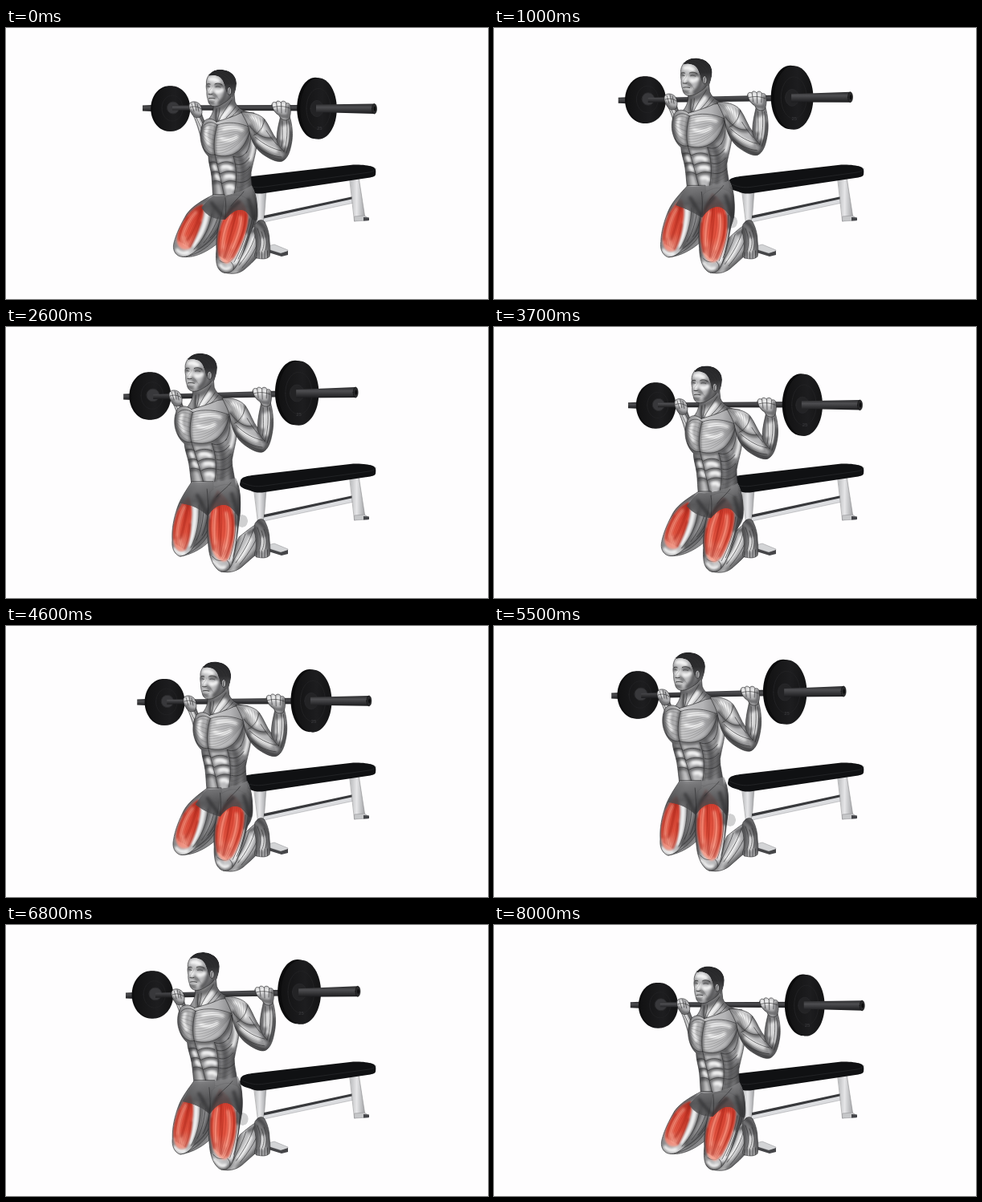
Animation of 600 by 338 pixels, one loop 8.1 s. Source, as an HTML page:

```html
<!DOCTYPE html>
<html lang="en">
<head>
<meta charset="utf-8">
<title>Kneeling barbell squat</title>
<style>
html, body { margin: 0; width: 100%; height: 100%; overflow: hidden; background: #fefdfe; }
svg { display: block; width: 100vw; height: 100vh; }
path { stroke-linecap: round; stroke-linejoin: round; }
.edge { fill: none; stroke: #2c2c2e; stroke-width: .9; opacity: .75; }
.line { fill: none; stroke: #2b2b2d; stroke-width: .85; opacity: .75; }
.hair { fill: none; stroke: #3f3f41; stroke-width: .45; opacity: .5; }
.dark { fill: none; stroke: #2a2a2c; stroke-width: 4.500; opacity: .55; filter: blur(1.7px); }
.deep { fill: none; stroke: #29292b; stroke-width: 9; opacity: .6; filter: blur(2.800px); }
.lite { fill: none; stroke: #fff; stroke-width: 4.500; opacity: .85; filter: blur(1.4px); }
.glow { fill: none; stroke: #ffb09c; stroke-width: 4; opacity: .65; filter: blur(1.5px); }
.red { fill: url(#red); filter: blur(.8px); }
.fibre { fill: none; stroke: #8f1c12; stroke-width: .5; opacity: .5; }
.burn { fill: none; stroke: #9b170d; stroke-width: 2.5; opacity: .5; filter: blur(1.2px); }
.ink { fill: none; stroke: #222; stroke-width: .95; opacity: .85; }
text { font: 700 6px "Liberation Sans", Arial, sans-serif; fill: #343437; }
</style>
</head>
<body>
<svg id="stage" viewBox="0 0 600 338" preserveAspectRatio="none">
  <defs id="defs">
    <linearGradient id="skin"><stop offset="0" stop-color="#818183"/><stop offset=".3" stop-color="#c9c9ca"/><stop offset=".65" stop-color="#b4b4b6"/><stop offset="1" stop-color="#6f6f71"/></linearGradient>
    <linearGradient id="face"><stop offset="0" stop-color="#a9a9ab"/><stop offset=".3" stop-color="#d2d2d3"/><stop offset=".6" stop-color="#a5a5a7"/><stop offset="1" stop-color="#707072"/></linearGradient>
    <linearGradient id="sole" x2="0" y2="1"><stop offset="0" stop-color="#69696b"/><stop offset="1" stop-color="#a4a4a6"/></linearGradient>
    <linearGradient id="crop" x2="0" y2="1"><stop offset="0" stop-color="#262628"/><stop offset=".5" stop-color="#2c2c2e"/><stop offset="1" stop-color="#626264"/></linearGradient>
    <linearGradient id="red" x2="0" y2="1"><stop offset="0" stop-color="#a83a2f"/><stop offset=".25" stop-color="#da4434"/><stop offset=".65" stop-color="#e65743"/><stop offset="1" stop-color="#efa091"/></linearGradient>
    <linearGradient id="shorts" x2="0" y2="1"><stop offset="0" stop-color="#8b8b8d" stop-opacity=".6"/><stop offset=".2" stop-color="#737375" stop-opacity=".9"/><stop offset=".6" stop-color="#4e4e50" stop-opacity=".9"/><stop offset="1" stop-color="#434345" stop-opacity=".65"/></linearGradient>
    <linearGradient id="steel" x2="0" y2="1"><stop offset="0" stop-color="#2b2b2d"/><stop offset=".35" stop-color="#4e4e51"/><stop offset="1" stop-color="#1b1b1d"/></linearGradient>
    <linearGradient id="disc"><stop offset="0" stop-color="#121213"/><stop offset=".6" stop-color="#1d1d1f"/><stop offset="1" stop-color="#131314"/></linearGradient>
    <linearGradient id="leg"><stop offset="0" stop-color="#b9babc"/><stop offset=".45" stop-color="#e6e6e8"/><stop offset="1" stop-color="#9fa0a3"/></linearGradient>
  </defs>
  <g id="bench">
    <path d="M309 204L324 202L321 242L314 244Z" fill="url(#leg)" stroke="#8b8b8e" stroke-width=".6"/>
    <path d="M326 272L334 270L351 277L350 280L342 281L326 276Z" fill="#d3d4d6" stroke="#8f8f92" stroke-width=".5"/>
    <path d="M326 276L342 281L351 278L351 283L343 285L327 280Z" fill="#454548"/>
    <path d="M321 236L437 211L438 217L321 242Z" fill="#dcdde0" stroke="#98999c" stroke-width=".5"/>
    <path d="M321 234L437 209L437 212L321 237.500Z" fill="#38393c"/>
    <path d="M428 188L439 186L447 237L434 241Z" fill="url(#leg)" stroke="#8b8b8e" stroke-width=".6"/>
    <path d="M434 235L446 234L451 237L451 240L434 241Z" fill="#c6c7c9" stroke="#88898c" stroke-width=".5"/>
    <path d="M445 236L452 236.500L452 240L445 240.500Z" fill="#444549"/>
    <path d="M292 191C294 187 300 186 306 185L428 171C438 170 450 171 456 173C460 174 461 177 460 183C459 186 455 186 450 187L322 206C316 207 310 207 304 204C297 202 291 200 291 196Z" fill="#101113"/>
    <path d="M294 194C302 198 312 200 322 198L452 180C457 179 459 178 460 176" fill="none" stroke="#26282a" stroke-width=".8"/>
  </g>
</svg>
<script>
const NS = 'http://www.w3.org/2000/svg', NUM = /-?\d+\.?\d*/g;
const stage = document.getElementById('stage'), defs = document.getElementById('defs');
const moving = [];

function el(tag, parent, attrs = {}) {
  const node = parent.appendChild(document.createElementNS(NS, tag));
  for (const k in attrs) node.setAttribute(k, attrs[k]);
  return node;
}
// Blend two paths of equal structure, with separate amounts for x and y.
function mix(a, b, kx, ky = kx) {
  const n = b.match(NUM);
  let i = 0;
  return a.replace(NUM, v => {
    const k = i % 2 ? ky : kx;
    return (+v + (n[i++] - v) * k).toFixed(2);
  });
}
function warp(d, f) {
  const n = d.match(NUM).map(Number);
  let i = 0;
  return d.replace(NUM, () => {
    const j = i++, e = j & ~1;
    return f(n[e], n[e + 1])[j & 1].toFixed(2);
  });
}
function oval(x, y, rx, ry) {
  const a = rx * .552, b = ry * .552;
  return `M${x - rx} ${y}C${x - rx} ${y - b} ${x - a} ${y - ry} ${x} ${y - ry}` +
    `C${x + a} ${y - ry} ${x + rx} ${y - b} ${x + rx} ${y}C${x + rx} ${y + b} ${x + a} ${y + ry} ${x} ${y + ry}` +
    `C${x - a} ${y + ry} ${x - rx} ${y + b} ${x - rx} ${y}Z`;
}
const strands = (a, b, n) => Array.from({ length: n }, (_, i) => mix(a, b, i / (n - 1))).join('');

function morph(parent, low, to, attrs) {
  const high = typeof to === 'function' ? warp(low, to) : to || low;
  moving.push({ node: el('path', parent, attrs), low, high });
}
function part(low, to, fill, layers = [], edge = true) {
  const id = 'clip' + moving.length;
  morph(el('clipPath', defs, { id }), low, to);
  const g = el('g', stage, { 'clip-path': `url(#${id})` });
  morph(g, low, to, { fill });
  for (const [cls, d, dTo] of layers) morph(g, d, dTo || to, { class: cls });
  if (edge) morph(stage, low, to, { class: 'edge' });
}
const shift = (dx, dy) => (x, y) => [x + dx, y + dy];

const headTo = (x, y) => [222.5 + (x - 249) * 1.06, 33 + (y - 52) * 1.03];
const neckTo = (x, y) => [x - 26, y - 17 + (y - 90) * .1];
const trunkTo = (x, y) => [211 + (x - 243) * 1.1 + .05 * (y - 140), y - 14.5];
const armTo = (x, y) => [x - 24, 1.1 * y - 27];
const rightHandTo = shift(-24, -16), leftHandTo = shift(-25, -13);
const leftDiscTo = (x, y) => [179 + (x - 204.5) * 1.06, 86 + (y - 100.5) * 1.05];
const rightDiscTo = (x, y) => [362 + (x - 387) * 1.1, 82.5 + (y - 100.5) * 1.05];

// Far heel, shin and glute
part(oval(300, 241, 7, 8), oval(294, 242, 7, 8), '#d0d0d1', [], false);
part('M219 285C232 288 250 280 264 268L264 246L240 258Z', 'M217 286C232 284 248 274 256 264L254 238L236 254Z', '#8c8c8e', [
  ['deep', 'M240 272C250 266 258 258 264 248', 'M236 270C242 264 250 256 254 242'],
  ['line', 'M228 284C242 280 254 272 262 260', 'M226 283C238 276 248 268 253 256']
]);
part('M294 199C306 198 314 215 313 235C312 246 304 254 297 258L288 220Z',
  'M274 193C288 194 293 210 291 232C290 240 289 248 286 252L270 220Z', '#555557');

// Near calf and foot
part('M272 305C282 308 292 306 298 300C308 292 318 280 326 270L322 242C314 240 304 252 299 258C292 274 284 290 272 305Z',
  'M268 305C280 308 290 303 296 297C306 288 316 280 326 270L320 241C312 245 302 252 290 262C284 276 278 290 268 305Z', 'url(#skin)', [
  ['deep', 'M298 258C296 272 290 286 280 298M324 272C314 284 304 296 292 304', 'M287 262C284 276 280 288 274 300M324 272C314 282 302 294 290 302'],
  ['dark', 'M304 254C312 252 318 250 322 254', 'M302 257C310 252 316 249 322 252'],
  ['lite', 'M308 262C304 274 300 282 293 290', 'M304 265C300 274 296 282 289 290'],
  ['line', 'M318 250C316 266 308 284 294 299M312 252C308 270 300 284 290 296M304 256C300 270 294 284 286 296', 'M316 250C314 264 304 280 291 296M308 252C304 266 296 280 286 294M298 258C294 270 288 282 282 294']
]);
part('M310 245C314 238 321 238 323 244C326 250 328 258 328 266C329 274 329 281 328 285C324 289 318 288 312 287C309 286 309 282 311 278C312 270 311 262 309 254Z', '', 'url(#sole)', [
  ['dark', 'M310 250C314 262 313 272 311 284M328 260C326 270 327 276 328 284M314 242C320 246 324 252 326 260'],
  ['lite', 'M320 264C321 270 320 274 319 278'],
  ['line', 'M312 280L312 288M315 279L315 288M318.500 279L318.500 289M322 278L322 289M325.500 278L325.500 288M313 250C317 260 318 268 315 278M318 254C322 264 322 270 319 278M321 252C325 262 325 270 323 277']
]);

// Left disc, bar, left forearm
morph(stage, 'M170 96.500L182 96L182 104L170 103.500Z', 'M146 83.500L158 83L158 91L146 90.500Z', { fill: 'url(#steel)' });
morph(stage, oval(203, 100.5, 22.8, 28.3), leftDiscTo, { fill: '#0d0d0e' });
morph(stage, oval(206, 100.5, 23.3, 28.3), leftDiscTo, { fill: 'url(#disc)' });
morph(stage, oval(207, 100, 13, 16), leftDiscTo, { fill: 'none', stroke: '#212123', 'stroke-width': 1 });
morph(stage, oval(208, 99.5, 7.5, 7.5), leftDiscTo, { fill: '#38383b', stroke: '#29292b' });
morph(stage, 'M207 96.500L386 96L386 103.500L207 102.500Z', 'M183 84L360 79L360 87L183 90Z', { fill: 'url(#steel)' });
part('M232 107C236 114 239 124 243 138L254 132C250 122 246 115 243 106Z', leftHandTo, '#8f8f91', [
  ['dark', 'M244 110C248 118 251 126 253 134'], ['lite', 'M237 110C240 116 242 122 244 128'], ['line', 'M236 110C240 118 244 126 246 134M240 109C244 116 247 122 250 130']
]);
part('M228 95C230 91 236 91 240 94C244 97 245 104 243 110C239 113 234 112 232 108C229 104 227 100 228 95Z', leftHandTo, '#b0b0b2', [
  ['dark', 'M230 104C234 110 238 112 243 110'],
  ['lite', 'M231 95L234 99'],
  ['line', 'M231 94L234 104M235 93L237 103M238 95L240 104M229 99C234 97 239 98 243 101']
]);

// Neck and trunk
part('M258 94C259 103 257 109 250 116L262 120L306 112C307 110 308 108 309 106C298 106 288 100 285 92L284 82Z', neckTo, 'url(#skin)', [
  ['deep', 'M258 98C266 102 276 97 283 88M285 92C286 100 294 106 306 108'], ['lite', 'M279 99C275 105 271 109 268 113'],
  ['dark', 'M262 104C260 110 261 114 262 118'],
  ['line', 'M281 90C275 99 268 108 264 117M262 101C261 108 261 112 262 117M286 98C282 104 278 108 274 112M266 100C266 106 264 110 263 116M290 101C286 106 282 110 278 112']
]);
part('M262 117C256 112 250 112 246 117C242 124 241 135 243 143C245 152 249 157 252 160C252 168 255 176 256 185C257 195 257 203 258 214L307 214C308 202 304 190 305 180C308 165 313 150 312 140L312 112C305 104 298 105 292 106C282 111 272 114 262 117Z', trunkTo, 'url(#skin)', [
  ['deep', 'M306 176C303 190 306 202 307 212M290 160C296 170 296 186 292 204M253 164C256 180 257 196 258 212'],
  ['dark', 'M246 152C252 160 258 161 262 160C274 163 288 160 296 148M284 162C288 176 288 194 285 208M262 122C259 136 258 148 260 158M253 169C258 168 262 168 264 171C270 168 278 168 284 170M256 182C260 179 264 180 267 183C273 179 281 179 286 181M258 193C262 191 266 192 269 195C275 191 282 191 287 193M260 160C264 176 268 192 272 210M304 125C304 134 300 144 294 151M244 122C242 130 242 140 245 148'],
  ['lite', 'M271 126C278 123 288 124 294 127M268 138C276 141 282 140 287 136M251 124C248 130 249 138 252 144M259 172L261 176M270 173C274 172 278 173 280 175M262 184L265 188M274 185C278 184 281 184 283 186M276 198C279 197 282 198 283 200M307 136C309 144 308 154 304 164'],
  ['hair', strands('M263 124C275 120 290 120 303 124', 'M261 156C272 158 288 150 303 127', 11) + strands('M261 124C256 120 250 121 247 124', 'M258 156C253 156 248 150 244 140', 7)],
  ['hair', strands('M285 164C292 168 298 164 302 158', 'M287 204C292 204 298 200 304 196', 9)],
  ['line', 'M263 121C259 134 258 147 260 158M263 121C275 116 292 118 304 124M260 158C270 162 285 160 293 150C298 144 302 136 304 126M263 121C257 116 250 117 247 121M260 158C254 159 248 156 245 148'],
  ['line', 'M260 158C264 175 268 190 272 212M253 168C258 166 262 167 264 170C270 166 278 166 283 169M256 180C260 178 264 179 267 182C273 178 281 178 285 180M258 191C262 190 266 191 269 194C275 190 282 190 287 192M283 160C287 172 288 190 284 208'],
  ['line', 'M283 160C290 163 296 160 300 154M286 170C293 172 299 168 303 162M288 180C294 182 300 178 304 173M288 192C296 194 302 190 305 186M304 126C306 136 304 148 299 156']
]);

// Far thigh
const fade = (a, b) => strands(a, b, 9);
part('M258 208C246 214 232 222 225 232C218 244 212 256 209 268C207 276 210 283 217 285C226 287 232 281 238 277C248 271 258 262 266 250C272 242 274 232 274 222L272 208Z',
  'M231 193C224 204 217 214 213 226C209 238 206 252 207 266C206 275 209 283 216 286C222 286 228 282 233 275C240 268 248 262 252 250C256 242 258 230 258 218L258 193Z', 'url(#skin)', [
  ['deep', 'M272 234C268 250 256 264 240 276M250 214C240 218 230 226 224 236', 'M255 228C252 246 246 262 234 274M232 196C224 206 218 216 215 226'],
  ['dark', 'M258 226C256 244 248 260 238 272', 'M242 220C243 240 240 258 232 272'],
  ['lite', 'M250 232C248 246 242 260 234 271M213 277C216 281 222 282 226 280', 'M235 220C236 238 234 256 229 272M210 277C212 281 217 283 221 282'],
  ['line', 'M256 232C254 248 246 264 234 276M264 236C260 248 254 258 246 268M270 236C266 248 260 256 254 262', 'M240 222C241 240 238 260 230 275M246 228C245 244 242 256 237 266M252 230C250 242 248 252 244 260'],
  ['red', 'M245 220C236 221 228 230 223 238C217 247 212 257 213 267C215 276 222 278 229 275C234 266 241 250 244 240C246 234 247 227 245 220Z',
    'M227 211C220 217 214 227 211 239C207 251 207 262 209 270C211 279 217 281 222 279C228 272 230 258 230 246C232 234 232 220 227 211Z'],
  ['glow', 'M236 230C229 238 222 250 219 262M222 262C221 266 222 270 225 270', 'M222 224C217 235 213 248 213 260M217 264C216 268 217 272 219 273'],
  ['burn', 'M244 222C240 240 234 254 226 264M242 242C238 254 234 264 229 273M226 236C220 244 216 254 215 264', 'M227 214C225 232 222 248 217 264M229 246C228 258 227 268 223 277M214 230C211 242 209 254 209 264'],
  ['fibre', fade('M242 222C230 230 218 246 216 266', 'M245 226C242 242 236 260 229 273'), fade('M226 214C216 226 209 246 211 270', 'M229 218C231 236 229 258 222 277')]
]);

// Near thigh
part('M272 212C284 206 298 206 308 222C312 234 308 248 303 258C298 272 293 288 286 298C281 306 271 308 266 302C261 297 261 286 262 276C261 262 264 246 268 234C270 226 270 220 272 212Z',
  'M254 206C262 196 280 192 290 204C293 218 291 234 289 250C287 266 285 284 281 296C277 306 267 308 262 301C257 296 253 286 252 274C250 258 250 242 252 230C253 222 253 214 254 206Z', 'url(#skin)', [
  ['deep', 'M309 222C309 244 304 258 297 272', 'M292 206C292 234 290 256 286 274'],
  ['lite', 'M298 258C295 272 291 282 285 292M267 296C268 300 274 303 279 300', 'M285 250C285 264 283 278 279 290M258 293C261 298 267 303 272 300'],
  ['dark', 'M264 300C270 307 278 307 286 298M267 240C263 254 262 268 263 286', 'M257 297C264 307 273 308 280 298M252 236C250 252 251 268 254 284'],
  ['line', 'M303 238C300 256 294 274 284 292M266 290C270 294 278 294 282 288M280 292C283 295 284 298 283 302M307 236C304 254 297 272 289 288', 'M285 232C287 252 284 272 278 290M257 286C261 292 269 294 275 288M275 291C278 294 279 297 278 301M289 228C290 250 287 270 283 286'],
  ['red', 'M287 214C294 214 299 222 301 233C302 246 297 260 292 271C288 281 283 291 275 294C268 292 264 284 264 274C263 262 266 248 270 239C274 231 281 222 287 214Z',
    'M263 203C271 209 281 221 283 235C286 250 284 268 280 281C278 291 272 295 267 291C260 286 256 278 255 268C252 256 253 240 255 228C256 219 259 211 263 203Z'],
  ['glow', 'M280 234C273 246 270 260 270 274M292 236C293 248 288 262 282 274M267 284C269 289 272 291 275 290', 'M261 228C258 242 258 256 260 270M274 232C278 246 277 262 273 276M259 278C262 285 266 289 270 287'],
  ['burn', 'M288 216C284 242 280 262 272 286M299 232C298 252 290 268 282 286M266 254C264 264 264 274 266 284', 'M264 206C266 236 267 260 267 286M282 234C284 254 280 270 274 288M254 240C253 254 255 266 258 278'],
  ['fibre', fade('M285 218C270 236 262 256 266 284', 'M294 220C304 240 292 268 277 291'), fade('M263 208C254 228 252 254 258 278', 'M268 212C287 230 286 266 271 290')]
]);

// Shorts
const shortsLow = 'M258 209C264 211 270 210 276 208C288 206 298 201 306 196C312 206 315 222 312 240C307 242 304 234 298 229C290 224 282 229 273 239C262 240 250 236 243 224C249 217 254 212 258 209Z';
const shortsHigh = 'M231 193C238 194 246 194 254 193C266 193 276 191 286 188C292 200 293 215 291 236C288 238 285 230 280 226C272 218 260 222 251 236C243 228 232 222 216 220C221 210 226 200 231 193Z';
part(shortsLow, shortsHigh, 'url(#shorts)', [
  ['dark', 'M273 238C276 230 282 222 290 217M272 237C266 230 260 224 256 218M310 206C313 216 313 228 311 240M302 214C305 222 307 230 308 238', 'M251 235C253 226 258 216 264 210M250 234C246 224 242 216 238 210M289 198C292 208 292 220 290 236M281 208C284 216 286 224 287 232'],
  ['line', 'M273 236C274 228 274 220 273 212M296 204C292 210 284 216 280 222', 'M251 232C252 222 251 212 250 202M280 194C276 200 266 206 262 212']
], false);

// Near arm
part('M293 105C303 104 316 107 322 114C328 122 331 132 337 139C337 128 340 118 342 109L353 110C356 120 358 133 355 146C353 156 350 163 344 166C338 168 330 164 322 159C312 153 305 142 303 128C301 118 296 112 293 105Z', armTo, 'url(#skin)', [
  ['deep', 'M304 134C310 150 326 164 344 167'],
  ['dark', 'M306 140C314 152 328 162 342 165M304 122C312 134 322 139 331 138M337 139C339 146 342 150 346 154M342 112C339 122 339 132 340 142M355 130C355 142 352 154 346 164M322 114C328 122 331 132 336 138'],
  ['lite', 'M306 111C313 114 317 121 319 127M314 141C322 148 330 151 336 153M350 122C351 132 350 140 348 146M345 124C345 130 345 134 344 138'],
  ['hair', strands('M296 107C304 112 308 122 309 133', 'M320 113C321 122 318 130 312 134', 7) + strands('M310 138C318 146 328 152 340 154', 'M312 150C320 157 332 163 343 164', 6)],
  ['line', 'M303 122C312 134 322 138 330 137M322 114C320 124 315 131 308 134M310 136C322 146 332 151 343 153M337 139C338 146 342 150 346 154M349 114C351 128 350 142 346 154M344 116C344 130 345 140 343 148M324 128C328 134 332 140 338 146M352 116C355 130 353 144 349 156M312 148C322 156 332 160 343 161']
]);

// Head
part('M253 58C250 62 249 66 249.500 70C248.800 73 249.500 76 250 79C249.600 83 250.500 87 251.500 90C252 94 254 96.500 257 97.500C261 98.500 265 97.500 269 95C274 92 279 89 281 84C285 78 286 70 283 62C277 54 262 52 253 58Z', headTo, 'url(#face)', [
  ['deep', 'M283 82C279 92 270 97 262 101'],
  ['dark', 'M274 76C274 84 271 89 266 93M250 72L254 73M261 72C264 71 267 71 270 73M258 82L261 86M252 93L258 94'],
  ['lite', 'M254 64C258 63 261 64 264 66M262 79C265 80 268 79 269 77M255 74L254 79'],
  ['hair', 'M257 72C256 76 252 79 252 81C253 83 256 83 258 82M260 82C262 85 264 87 265 89M252 91C255 93 258 92 260 91'],
  ['ink', 'M250.500 70C252 69.500 253 69.500 254 70M260 70C263 68.500 266 69 269 71M252 82.500C253.500 83 255 83 256.500 82.500M252.500 87.800C255 87 258 87.500 260 88'],
  ['line', 'M251.500 73L254 73.500M261 73.500C263 72.700 265 73 267 74']
]);
part('M252.500 60C254 54 262 51 270 52C280 53 287 60 287 69C287 75 285 81 283 87L280 85L274.500 80C272.500 76 273 73 271 69C270 65 267 61 263 60C259 58.500 256 58.500 252.500 60Z', headTo, 'url(#crop)', [
  ['hair', 'M260 57C268 56 277 62 280 72M266 55C276 57 282 64 283 74']
], false);
part(oval(278, 78.5, 2.7, 5), headTo, '#a0a0a2', [['line', 'M279 75C277 77 277 81 278 83']]);

// Right disc, sleeve and hand
morph(stage, oval(385, 100, 22.8, 38.3), rightDiscTo, { fill: '#0b0b0c' });
morph(stage, oval(389, 100.5, 22.8, 38.3), rightDiscTo, { fill: 'url(#disc)' });
morph(stage, oval(389, 100.5, 15, 25), rightDiscTo, { fill: 'none', stroke: '#222224', 'stroke-width': 1 });
morph(stage, oval(387, 100.5, 8, 10), rightDiscTo, { fill: '#232325', stroke: '#2c2c2f', 'stroke-width': .7 });
morph(stage, 'M386 95.500L459 94.500L459 107L386 105Z', 'M361 78L435 75L435 88L361 88.500Z', { fill: 'url(#steel)' });
morph(stage, oval(458.5, 100.8, 3, 6.3), oval(435, 81.5, 3, 6.5), { fill: '#29292b', stroke: '#111', 'stroke-width': .6 });
morph(stage, oval(459, 100.8, 1.3, 3), oval(435.5, 81.5, 1.3, 3.1), { fill: '#0c0c0d' });
const mark = el('text', stage);
mark.textContent = '25';
part('M331 96C331 92 334 92 336 93C337 90 341 91 342 93C344 90 348 91 349 94C352 93 354 95 354 98C355 104 354 110 352 114C348 116 342 115 340 109C336 107 332 102 331 96Z', rightHandTo, '#b9b9bb', [
  ['dark', 'M334 105C340 110 346 112 353 109M352 98C353 104 352 108 351 113'],
  ['lite', 'M334 95L335 98M340 94L340 98M346 95L346 99'],
  ['line', 'M336.500 93L338 104M342.500 93L343 106M348.500 94L348 105M332 99C338 97 346 97 353 100']
]);

// Lift with rounded ends: 0 is low, 1 is high; two lifts per loop.
function rise(t) {
  const half = 2025, a = 388, b = 244, s = 1 / (half - (a + b) / 2);
  const u = half - Math.abs(half - t % (2 * half));
  if (u < a) return s * u * u / (2 * a);
  if (u > half - b) return 1 - s * (half - u) ** 2 / (2 * b);
  return s * (u - a / 2);
}
function draw(t) {
  const p = rise(t), kx = p / .74, ky = (1 - (1 - p) ** 1.85) / .917;
  for (const m of moving) m.node.setAttribute('d', mix(m.low, m.high, kx, ky));
  mark.setAttribute('x', 387 - 26 * kx);
  mark.setAttribute('y', 127 - 16 * ky);
}
const start = performance.now();
let last = -1;
function tick() {
  const step = Math.floor((performance.now() - start) / 100) % 81;
  if (step !== last) draw((last = step) * 100);
  requestAnimationFrame(tick);
}
tick();
</script>
</body>
</html>
```
